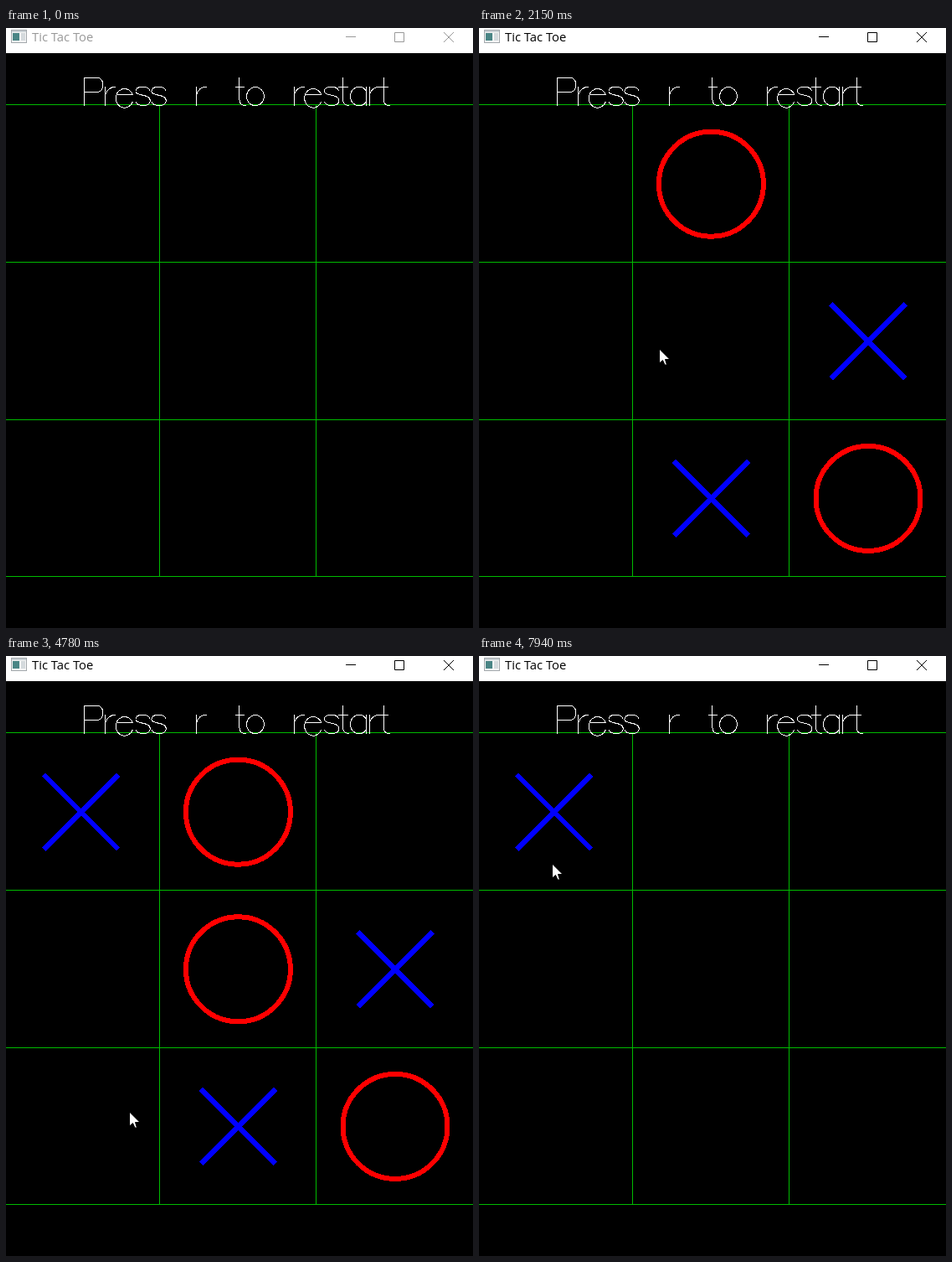
An HTML page for the animation above (8 s loop, 558 px wide and 716 px high).

```html
<!DOCTYPE html>
<html lang="en">
<head>
<meta charset="utf-8">
<title>Tic Tac Toe</title>
<style>
  html, body { margin: 0; width: 100%; height: 100%; overflow: hidden; background: #000; }
  svg { display: block; width: 558px; height: 716px; }
  path, circle { fill: none; vector-effect: non-scaling-stroke; }
  #bar { color: #999; }
  #bar.active { color: #000; }
  #bar text { font: 14.8px "Open Sans", "Noto Sans", sans-serif; fill: currentColor; }
  #bar path { stroke: currentColor; }
  #board { shape-rendering: crispEdges; }
  .line { stroke: #0b0; }
  .word { stroke: #fff; }
  .X { stroke: #00f; stroke-width: 6; }
  .O { stroke: #f00; stroke-width: 6; }
  #cursor { fill: #fff; stroke: #000; }
</style>
</head>
<body>
<svg viewBox="0 0 558 716">
  <g id="board"></g>
  <g id="bar">
    <rect width="558" height="30" fill="#fff"/>
    <rect x="6.5" y="2.5" width="18" height="15" fill="#f4f4f4" stroke="#a3a8ac"/>
    <rect x="7" y="3" width="17" height="2" fill="#c9d0d4"/>
    <rect x="8" y="6" width="8" height="9" fill="#4a8585"/>
    <rect x="18" y="6" width="5" height="9" fill="#d5dadd"/>
    <text x="31" y="16">Tic Tac Toe</text>
    <path d="M406 10.5H418M464.5 5.5H475.5V16.5H464.5ZM523 5L535 17M535 5L523 17"/>
  </g>
  <path id="cursor" d="M-.5-1V16L3.5 12.5L6 18H8.5L6.5 11.5H12Z"/>
</svg>
<script>
const LOOP = 8000, TICK = 77, LEAD = 20;
const CELL = 187.6, LEFT = -4.3, TOP = 91.9;
const board = document.getElementById('board');
const bar = document.getElementById('bar');
const cursor = document.getElementById('cursor');

function add(parent, tag, attrs) {
  const el = document.createElementNS('http://www.w3.org/2000/svg', tag);
  for (const key in attrs) el.setAttribute(key, attrs[key]);
  return parent.appendChild(el);
}

// Single-stroke letters: [advance, outline], capitals 100 units high
const stem = 'M0 0V-100';
const loop = stem + 'H43Q67-100 67-74T43-48H0';
const bowl = 'A31 34 0 1 0 57-14';
const glyphs = {
  ' ': [104, ''],
  P: [76, loop],
  R: [73, loop + 'M33-48L67 0'],
  D: [88, stem + 'H33Q67-100 67-50T33 0H0'],
  A: [82.5, 'M0 0L38-100L76 0M14-33H62'],
  W: [95, 'M0-100L24 0L48-100L71 0L95-100'],
  r: [40.5, 'M0 0V-67M0-38Q8-67 38-67'],
  e: [68, 'M0-38H57' + bowl],
  a: [69, 'M57 0V-67M57-52' + bowl],
  o: [66, 'M0-33A31 33 0 1 1 0-32Z'],
  s: [57, 'M52-52Q47-67 26-67Q0-67 0-50C0-33 52-43 52-17Q52 0 26 0Q5 0 0-14'],
  t: [36, 'M10-100V-20Q10 0 33 0M-6-67H28']
};

function write(text, x, y, scale) {
  const word = add(board, 'g', {
    class: 'word', role: 'img', 'aria-label': text,
    transform: `translate(${x} ${y}) scale(${scale})`
  });
  let pen = 0;
  for (const letter of text) {
    const [advance, d] = glyphs[letter];
    add(word, 'path', { d, transform: `translate(${pen})` });
    pen += advance;
  }
  return word;
}

function addMark(kind, cell) {
  const x = LEFT + CELL * (cell % 3 + 0.5) + 0.3;
  const y = TOP + CELL * (Math.floor(cell / 3) + 0.5) + 0.5;
  const transform = `translate(${x} ${y})`;
  return kind === 'X'
    ? add(board, 'path', { class: kind, transform, d: 'M-44.5-44.5l89 89m0-89l-89 89' })
    : add(board, 'circle', { class: kind, transform, r: 62.5 });
}

for (let i = 0; i < 4; i++) {
  add(board, 'path', { class: 'line', d: `M0 ${TOP + i * CELL}H558` });
  add(board, 'path', { class: 'line', d: `M${LEFT + i * CELL} ${TOP}v${3 * CELL}` });
}
write('Press r to restart', 93.5, 92.5, 0.333);

// Each click places X; the reply O follows two ticks later, or the game ends
const RESTART = 92, REPLY = 2;
const items = [{ el: write('DRAW', 96.5, 654.5, 0.62), from: 80 + REPLY, to: RESTART }];
function play(tick, cell, reply, to = RESTART) {
  items.push({ el: addMark('X', cell), from: tick, to });
  if (reply !== undefined) items.push({ el: addMark('O', reply), from: tick + REPLY, to });
}
play(8, 7, 8);
play(19, 5, 1);
play(50, 0, 4);
play(68, 6, 3);
play(80, 2);
play(102, 0, undefined, Infinity);

// Pointer stops: [arrival tick, x, y, ticks held]
const stops = [
  [1, 408, 690], [4, 284, 516, 5], [16, 430, 350], [20, 383, 311], [31, 154, 412],
  [38, 281, 319], [43, 190, 435], [49, 39, 230], [51, 72, 259], [53, 184, 405],
  [59, 148, 545, 5], [66, 107, 533, 2], [72, 114, 506], [78, 474, 189, 3],
  [89, 388, 327, 2], [98, 84, 236, 2], [103, 88, 249]
];

function pointerAt(tick) {
  const i = Math.max(0, stops.findLastIndex(stop => stop[0] <= tick));
  const [arrive, x, y, hold = 0] = stops[i];
  const [next, nextX, nextY] = stops[i + 1] || [Infinity, x, y];
  const k = Math.max(0, (tick - arrive - hold) / (next - arrive - hold));
  return [x + (nextX - x) * k, y + (nextY - y) * k].map(Math.round);
}

const show = (el, on) => { el.style.display = on ? '' : 'none'; };

function draw(now) {
  const tick = Math.floor((now % LOOP + LEAD) / TICK);
  bar.classList.toggle('active', tick >= 7);
  for (const { el, from, to } of items) show(el, tick >= from && tick < to);
  show(cursor, tick >= 1);
  cursor.setAttribute('transform', `translate(${pointerAt(tick)})`);
}

const start = performance.now();
function animate() {
  draw(performance.now() - start);
  requestAnimationFrame(animate);
}
animate();
</script>
</body>
</html>
```
